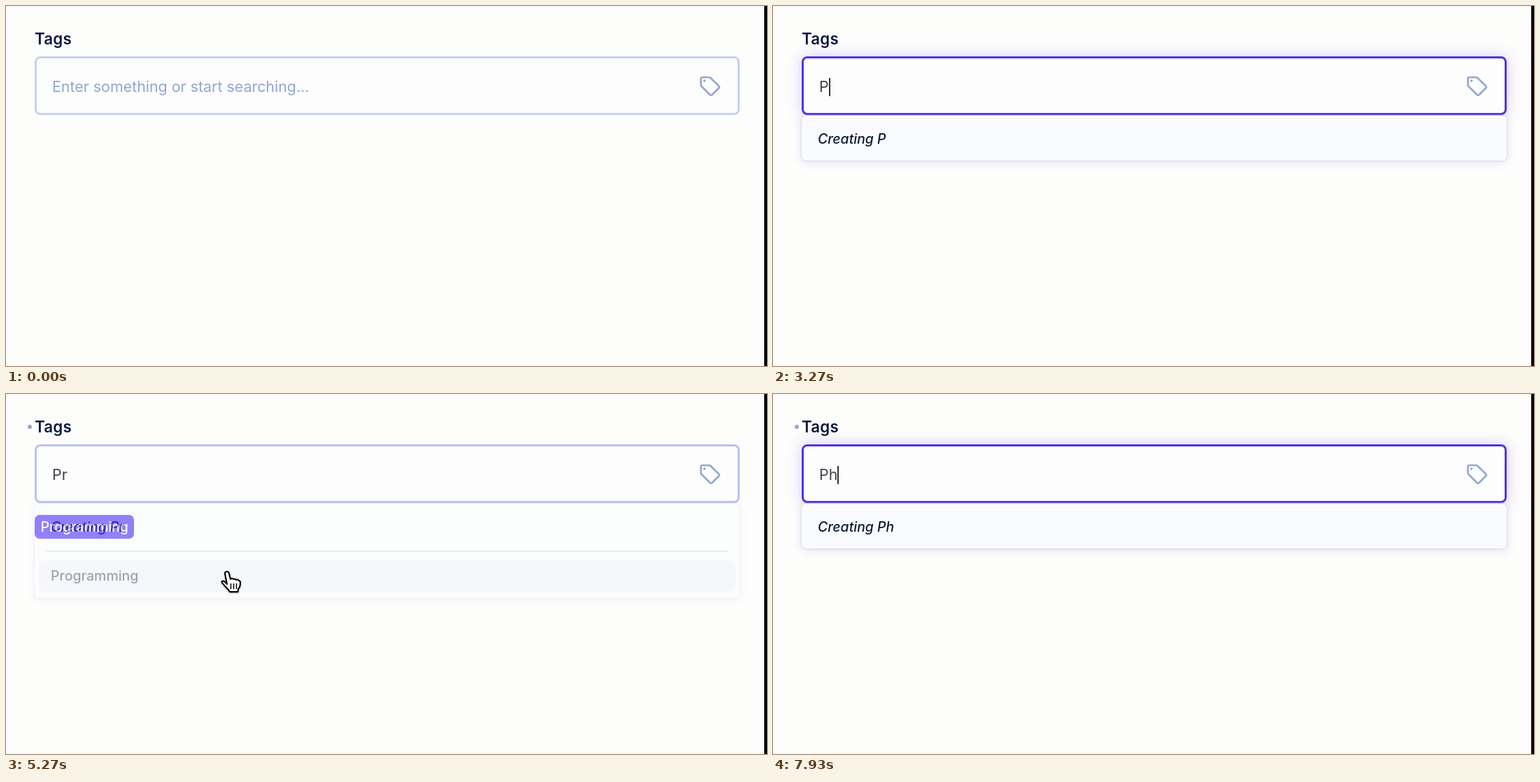
An HTML page for the animation above (8 s loop, 1088 by 515 pixels).

```html
<!DOCTYPE html>
<html lang="en">
<head>
<meta charset="utf-8">
<title>Tag input</title>
<style>
html, body { margin: 0; width: 100%; height: 100%; overflow: hidden; background: #fdfdfc; }
body { position: relative; font: 500 19.5px Inter, sans-serif; font-optical-sizing: none; color: #0f1a33; }
div, svg { position: absolute; box-sizing: border-box; white-space: pre; }
svg { left: 0; top: 0; width: 1088px; height: 515px; }
#label { left: 41px; top: 32px; line-height: 30px; font-size: 22.3px; letter-spacing: .2px; font-weight: 600; color: #0f1840; }
#dot { left: 30.5px; top: 44px; width: 6px; height: 6px; border-radius: 50%; background: #9aa8c8; }
#field { left: 41px; top: 72px; width: 1008px; height: 84px; border: 3px solid; border-radius: 8px; background: #fdfdfd; }
.value { left: 66px; top: 100px; line-height: 30px; font-size: 21.4px; font-weight: 400; color: #43434f; }
#hint { color: #92a5d2; }
#caret { display: inline-block; width: 2px; height: 26px; margin-right: -2px; vertical-align: -6px; background: #33333c; }
#chip { left: 41px; top: 173px; width: 142px; height: 34px; padding-left: 8.5px; line-height: 34px; border-radius: 7px; background: #5030f6; color: #fff; }
#list { left: 41px; top: 157px; width: 1008px; border-radius: 6px; background: #f9fbfe; box-shadow: 0 0 3px #c4c6e6, 0 2px 14px rgba(110, 100, 200, .2); overflow: hidden; }
.row { left: 6px; width: 996px; height: 45px; padding-left: 17px; line-height: 45px; border-radius: 8px; }
#create { top: 11px; font-size: 19.4px; font-style: italic; }
#rule { left: 17px; top: 66.5px; width: 974px; height: 2.5px; background: #cbd3dc; }
#edge { left: 1084px; top: 0; width: 4px; height: 515px; background: #000; }
</style>
</head>
<body>
<div id="label">Tags</div>
<div id="dot"></div>
<div id="field"></div>
<div id="hint" class="value">Enter something or start searching...</div>
<div class="value"><span id="text"></span><span id="caret"></span></div>
<svg fill="none" stroke="#96a9cc" stroke-width="2.7" stroke-linejoin="round">
  <path d="M995.5 102H1005q1.4 0 2.4 1L1019 114.3q1.5 1.6 0 3.2L1009.5 127q-1.5 1.3-3 0L994.5 115q-1-1-1-2.4V104q0-2 2-2z"/>
  <circle cx="998.6" cy="107" r="1.8" fill="#96a9cc" stroke="none"/>
</svg>
<div id="chip">Programming</div>
<div id="list">
  <div class="row" id="create"></div>
  <div id="rule"></div>
  <div class="row" style="top:81px">Programming</div>
  <div class="row" style="top:127px">Python</div>
</div>
<svg stroke-linejoin="round" stroke-linecap="round">
  <defs><path id="bar" d="M-6-14q5 0 6 3q1-3 6-3M0-11V11M-6 14q5 0 6-3q1 3 6 3M-3 4H3"/></defs>
  <g id="arrow" fill="#000" stroke="#fff" stroke-width="2">
    <path d="M0 0V23L5.5 18L9.500 27L13.5 25.2L9.5 16.5H17z"/>
  </g>
  <g id="beam" fill="none">
    <use href="#bar" stroke="#fff" stroke-width="4"/>
    <use href="#bar" stroke="#000" stroke-width="2"/>
  </g>
  <g id="hand" fill="#fff" stroke="#000" stroke-width="2" style="filter:drop-shadow(0 1px 1px #0006)">
    <path d="M-3 3Q-3 0 0 0Q2.5 0 3 3L5 11Q7 8.5 9 11Q11.5 9.5 13 12Q15.5 10.5 17 13Q19 13 19 16Q19 22 16 25L15.5 29H4L2 26Q-3 21-7 16Q-8.5 13.5-5.5 13.5Q-3 14 0 18z"/>
    <path stroke-width="1.5" d="M5.5 17.5v7M9.5 17.5v7M13.5 17.5v7"/>
  </g>
</svg>
<div id="edge"></div>
<script>
const LOOP = 8000;
const $ = id => document.getElementById(id);
const rows = [...document.querySelectorAll('.row')];
const pointers = ['arrow', 'beam', 'hand'];

// pointer path: time, x, y
const path = [
  [150, 440, 386], [750, 401, 118], [1150, 396, 105], [1600, 402, 110], [1900, 401, 108],
  [4420, 401, 108], [4800, 323, 248], [4900, 323, 248], [5180, 316, 254], [5400, 316, 254],
  [5920, 278, 111], [8000, 278, 111]
];
const typed = [[0, ''], [3100, 'P'], [3930, 'Pr'], [7270, 'P'], [7600, 'Ph']];
const matches = [[0, 0], [3400, 2], [4200, 1], [7870, 0]];

const ramp = (t, start, span) => Math.min(1, Math.max(0, (t - start) / span));
const at = (steps, t) => steps.filter(s => s[0] <= t).pop()[1];
const mix = (a, b, k) => a.map((v, i) => v + (b[i] - v) * k);
const show = (el, on) => { el.style.visibility = on ? 'visible' : 'hidden'; };

function pointerAt(t) {
  const i = path.findIndex(p => p[0] > t);
  if (i < 1) return path[0].slice(1);
  const a = path[i - 1], b = path[i], k = ramp(t, a[0], b[0] - a[0]);
  return mix(a, b, k * k * (3 - 2 * k)).slice(1);
}

function drawField(t) {
  const hover = ramp(t, 620, 150) - ramp(t, 4600, 150) + ramp(t, 5700, 150);
  const focus = ramp(t, 1990, 180) - ramp(t, 5185, 95) + ramp(t, 5960, 200);
  const glow = ramp(t, 1920, 110) - ramp(t, 5180, 90) + ramp(t, 5960, 120);
  const idle = mix([200, 209, 240], [147, 163, 204], hover);
  $('field').style.borderColor = `rgb(${mix(idle, [87, 51, 222], focus)})`;
  $('field').style.boxShadow = `0 0 20px rgba(100, 85, 255, ${0.3 * glow})`;

  const text = at(typed, t);
  $('text').textContent = text;
  show($('hint'), !text);
  const focused = t >= 1930 && t < 5180 || t >= 5960;
  const blinkStart = [1930, 3100, 3930, 5960, 7270, 7600].filter(s => s <= t).pop();
  show($('caret'), focused && (t - blinkStart) % 1000 < 500);
  $('create').textContent = 'Creating ' + text;
}

function drawList(t, x, y, pointing) {
  const count = at(matches, t);
  const open = ramp(t, 3100, 130) - ramp(t, 5195, 125) + ramp(t, 5960, 130);
  $('list').style.opacity = open;
  $('list').style.height = [64, 135, 181][count] + 'px';
  show($('rule'), count);
  let over = false;
  rows.forEach((row, i) => {
    const top = 157 + row.offsetTop;
    const hit = pointing && open > 0 && i <= count && y >= top && y < top + 45;
    row.style.background = hit ? '#edf0fa' : 'none';
    show(row, i <= count);
    over = over || hit;
  });
  return over;
}

function draw(now) {
  const t = now % LOOP;
  const [x, y] = pointerAt(t);
  const pointing = t >= 150 && t < 3100 || t >= 4420 && t < 7270;
  drawField(t);
  const over = drawList(t, x, y, pointing);
  const kind = over ? 'hand' : y > 72 && y < 156 ? 'beam' : 'arrow';
  for (const id of pointers) {
    show($(id), pointing && id === kind);
    $(id).setAttribute('transform', `translate(${x} ${y})`);
  }
  show($('dot'), t >= 5220);
  show($('chip'), t >= 5220);
}

const start = performance.now();
function tick() {
  draw(performance.now() - start);
  requestAnimationFrame(tick);
}
tick();
</script>
</body>
</html>
```
